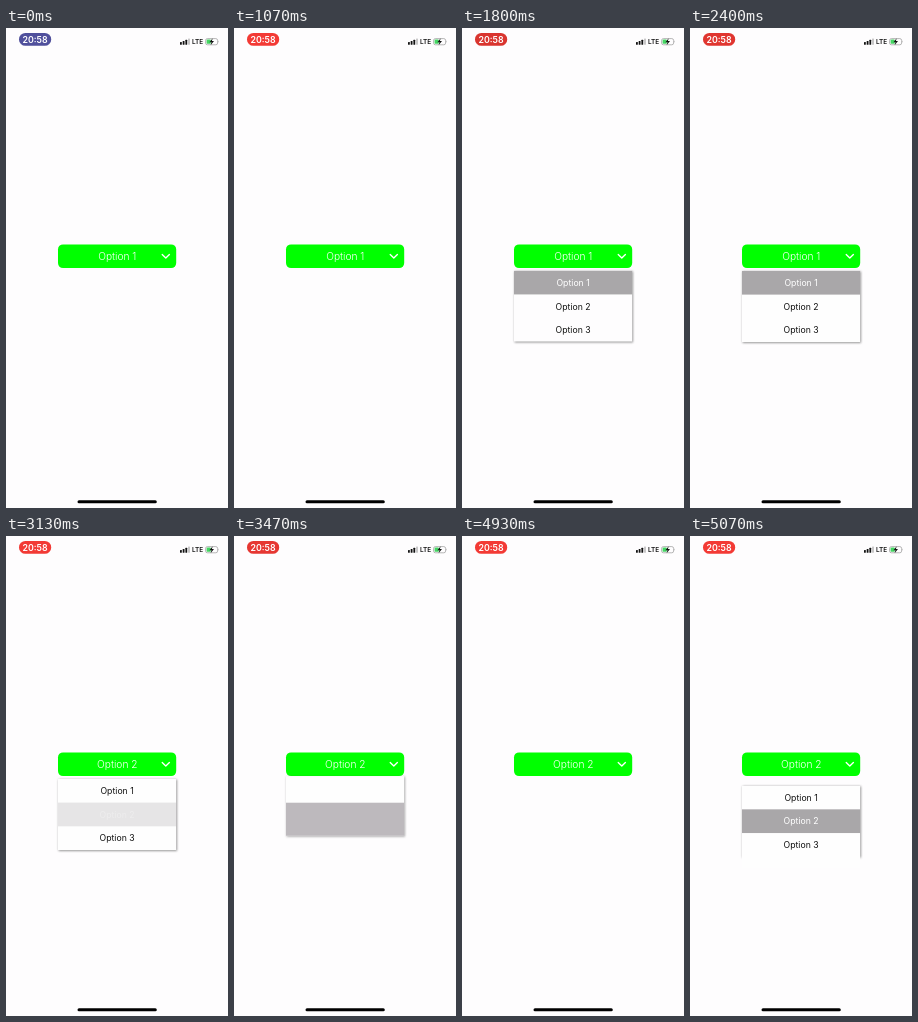
An HTML page for the animation above (5.14 s loop, 222x480 px).

```html
<!DOCTYPE html>
<html lang="en">
<head>
<meta charset="utf-8">
<title>Drop-down menu</title>
<style>
  html, body { margin: 0; width: 100%; height: 100%; overflow: hidden; background: #fefdfe; }
  #stage { display: block; width: 100vw; height: 100vh; font-family: Inter, Roboto, sans-serif; }
  .middle { text-anchor: middle; }
</style>
</head>
<body>
<svg id="stage" viewBox="0 0 222 480">
  <defs>
    <filter id="soft" x="-10%" y="-10%" width="120%" height="130%">
      <feGaussianBlur stdDeviation="0.9"/>
    </filter>
  </defs>
  <rect width="222" height="480" fill="#fefdfe"/>

  <rect id="pill" x="13" y="5" width="32.2" height="12.8" rx="6.4"/>
  <text class="middle" x="29" y="14.6" font-size="8.8" font-weight="600" fill="#fff">20:58</text>

  <g fill="#111">
    <rect x="174" y="14" width="1.8" height="2.8" rx=".5"/>
    <rect x="176.7" y="13" width="1.8" height="3.8" rx=".5"/>
    <rect x="179.4" y="11.8" width="1.8" height="5" rx=".5"/>
    <rect x="182.1" y="10.6" width="1.8" height="6.2" rx=".5" opacity=".25"/>
    <text x="186" y="16.4" font-size="6.4" font-weight="600" textLength="">LTE</text>
  </g>
  <rect x="199.6" y="10.6" width="12" height="6.2" rx="1.8" fill="none" stroke="#999" stroke-width=".7"/>
  <rect x="200.6" y="11.6" width="4.2" height="4.2" rx=".9" fill="#45d663"/>
  <path d="M212.5 12.6q1.1 1.1 0 2.2z" fill="#999"/>
  <path d="M206.7 10.3l-3.3 3.9h2.1l-.9 3 3.4-4.1h-2.1z" fill="#111"/>

  <rect x="52" y="216.4" width="118.2" height="23.7" rx="5" fill="#0f0"/>
  <text id="choice" class="middle" x="111.3" y="231.8" font-size="10.2" font-weight="300" fill="#fff"></text>
  <path d="M156.2 226.6l3.6 3.3 3.6-3.3" fill="none" stroke="#fff" stroke-width="1.4" stroke-linecap="round" stroke-linejoin="round"/>

  <g id="menu">
    <rect id="shadow" x="52.6" width="118.4" fill="#555" opacity=".65" filter="url(#soft)"/>
    <svg id="table" x="52" width="118.4">
      <rect width="118.4" height="110" fill="#fefefe"/>
      <g id="rows"></g>
      <rect id="block" width="118.4" height="80" fill="#bdb9bd"/>
    </svg>
  </g>

  <rect x="71.5" y="472.2" width="79.3" height="3" rx="1.5" fill="#000"/>
</svg>
<script>
const LOOP = 5140, OPEN = 1465, PICK = 3015, CLOSE = 3415, GONE = 3870, REOPEN = 4940;
const HEAD = 216.3, ROW = 23.7, TOP = 242.9, WIDTH = 118.4;
const $ = id => document.getElementById(id);
const set = (el, attrs) => { for (const k in attrs) el.setAttribute(k, attrs[k]); };
const clamp = v => Math.min(1, Math.max(0, v));
const mix = (a, b, p) => a + (b - a) * p;
const blend = (a, b, p) => a.map((v, i) => mix(v, b[i], p));

function add(parent, tag, attrs) {
  const el = document.createElementNS("http://www.w3.org/2000/svg", tag);
  set(el, attrs);
  return parent.appendChild(el);
}

const rows = [1, 2, 3].map((n, i) => {
  const fill = add($("rows"), "rect", { y: i * ROW, width: WIDTH, height: ROW, fill: "#a9a7a9" });
  const label = add($("rows"), "text", { class: "middle", x: 59.1, y: i * ROW + 15.1, "font-size": 8.7 });
  label.textContent = "Option " + n;
  return { fill, label };
});

// Damped spring from 0 to 1, time in ms
function spring(ms, zeta, omega) {
  const t = Math.max(0, ms) / 1000, root = Math.sqrt(1 - zeta * zeta), a = omega * root * t;
  return 1 - Math.exp(-zeta * omega * t) * (Math.cos(a) + zeta / root * Math.sin(a));
}

function drawPill(t) {
  const pulse = (1 + Math.cos((t - 1000) * Math.PI / 1000)) / 2;
  const red = blend([214, 52, 46], [243, 58, 53], pulse);
  const c = blend([80, 80, 156], red, clamp(t / 450));
  $("pill").setAttribute("fill", `rgb(${c.map(Math.round)})`);
}

function drawRows(t) {
  const picked = t < PICK ? 0 : 1;
  const fade = picked && t < CLOSE ? clamp((t - PICK) / 400) : 1;
  rows.forEach((row, i) => {
    const on = i === picked;
    set(row.fill, { opacity: on ? fade : 0 });
    set(row.label, { fill: on ? "#fff" : "#111", opacity: on ? fade : 1 });
  });
}

function drawMenu(t) {
  const shown = (t >= OPEN && t < GONE) || t >= REOPEN;
  $("menu").style.display = shown ? "" : "none";
  if (!shown) return;
  const closing = t >= CLOSE && t < GONE;
  let top, height, alpha = 1, shade = 0.65;
  if (closing) {
    const p = spring(t - CLOSE, 0.9, 14);
    top = mix(TOP, 240, clamp(p * 5));
    height = Math.max(0, mix(TOP + 3 * ROW, 240, p) - top);
    shade *= clamp(1 - p);
  } else {
    const p = spring(t - (t < REOPEN ? OPEN : REOPEN), 0.4, 26.2);
    top = mix(HEAD, TOP, p);
    height = mix(ROW, 3 * ROW, p);
    alpha = clamp(p);
  }
  set($("menu"), { opacity: alpha });
  set($("table"), { y: top, height });
  set($("shadow"), { y: top + 0.6, height: Math.min(height, 3 * ROW) + 0.3, opacity: shade });
  $("rows").style.display = closing ? "none" : "";
  $("block").style.display = closing ? "" : "none";
  set($("block"), { y: 266.7 - top });
  drawRows(t);
}

function draw(now) {
  const t = now % LOOP;
  drawPill(t);
  $("choice").textContent = t < PICK ? "Option 1" : "Option 2";
  drawMenu(t);
}

const start = performance.now();
function tick() {
  draw(performance.now() - start);
  requestAnimationFrame(tick);
}
tick();
</script>
</body>
</html>
```
